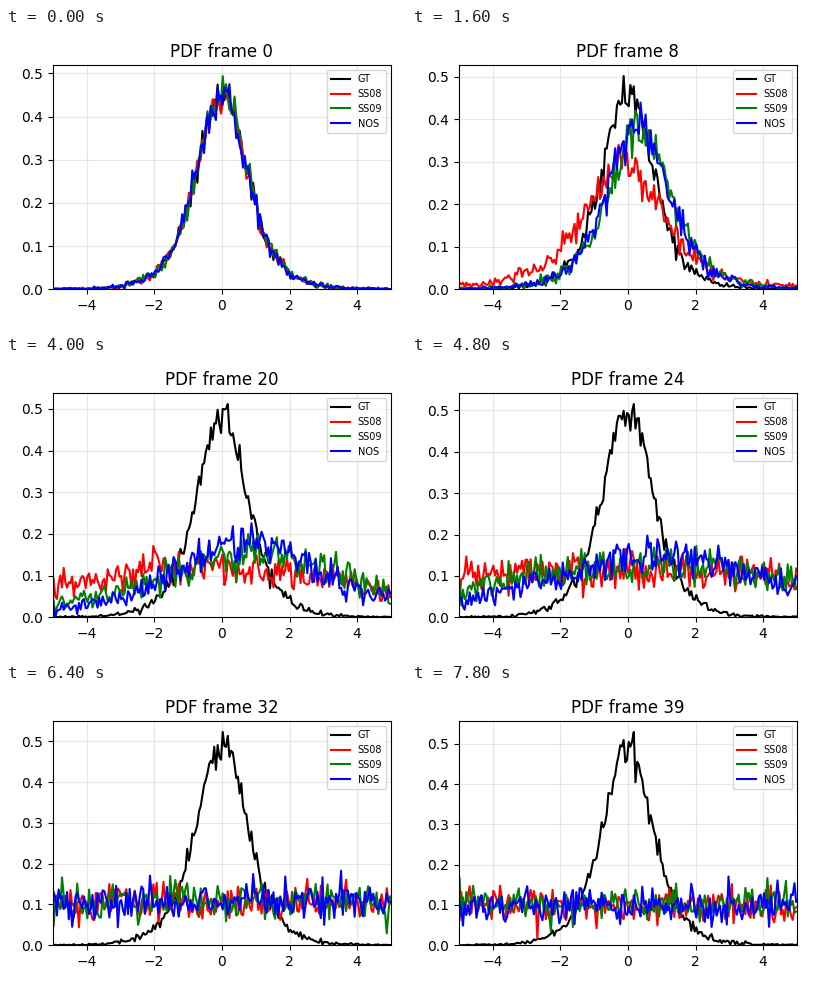
These frames come from a looping animation (400x300 px, 8000 ms). A matplotlib script:

```python
import matplotlib.pyplot as plt
import numpy as np
from matplotlib.animation import FuncAnimation

FRAMES, INTERVAL = 40, 200
BINS = 200
STEP = 10 / BINS
x = -5 + STEP * (np.arange(BINS) + .5)
base = np.random.default_rng(7).standard_normal(BINS)

# label: colour, spreading rate and power, tail decay time, drift per step
SERIES = {
    "GT": ("black", 0, 1, np.inf, 0),
    "SS08": ("red", .012, 1.7, 10, -.015),
    "SS09": ("green", .0033, 2, 20, .045),
    "NOS": ("blue", .0026, 2, 22, .04),
}


def density(i, rate, power, decay, drift):
    """Bell curve that widens exponentially, drifts and grows heavy tails."""
    half = .9 * np.exp(rate * i ** power)
    q = 1 + 2 * np.exp(-(i / decay) ** 2)
    g2 = half ** 2 / (2 ** (1 / q) - 1)
    p = (1 + (x - drift * i) ** 2 / g2) ** -q
    return p / (p.sum() * STEP)


def curves(i):
    rng = np.random.default_rng(100 + i)
    shared = .6 * base + .8 * rng.standard_normal(BINS)
    mix = .5 * np.exp(-i / 4)
    rough = .035 + .00125 * min(i, 28)
    out = []
    for label, (_, *motion) in SERIES.items():
        p = density(i, *motion)
        if label == "GT":
            noise = .035 * shared
        else:
            own = rng.standard_normal(BINS)
            noise = rough * (mix * shared + np.sqrt(1 - mix ** 2) * own)
        out.append(np.maximum(p + noise * np.sqrt(p), 0))
    top = .494 + .0009 * i
    return np.array(out) * top / np.max(out), top


fig, ax = plt.subplots(figsize=(4, 3), dpi=100)
lines = [ax.plot([], [], color=spec[0], lw=1.5, label=label)[0]
         for label, spec in SERIES.items()]
ax.set_xlim(-5, 5)
ax.grid(True, alpha=.3)
ax.legend(fontsize=7, loc="upper right")


def update(i):
    data, top = curves(i)
    for line, y in zip(lines, data):
        line.set_data(x, y)
    ax.set_ylim(0, 1.05 * top)
    ax.set_title(f"PDF frame {i}")
    return lines


update(0)
fig.tight_layout()
anim = FuncAnimation(fig, update, frames=FRAMES, interval=INTERVAL,
                     repeat=True, repeat_delay=0)
plt.show()
```
